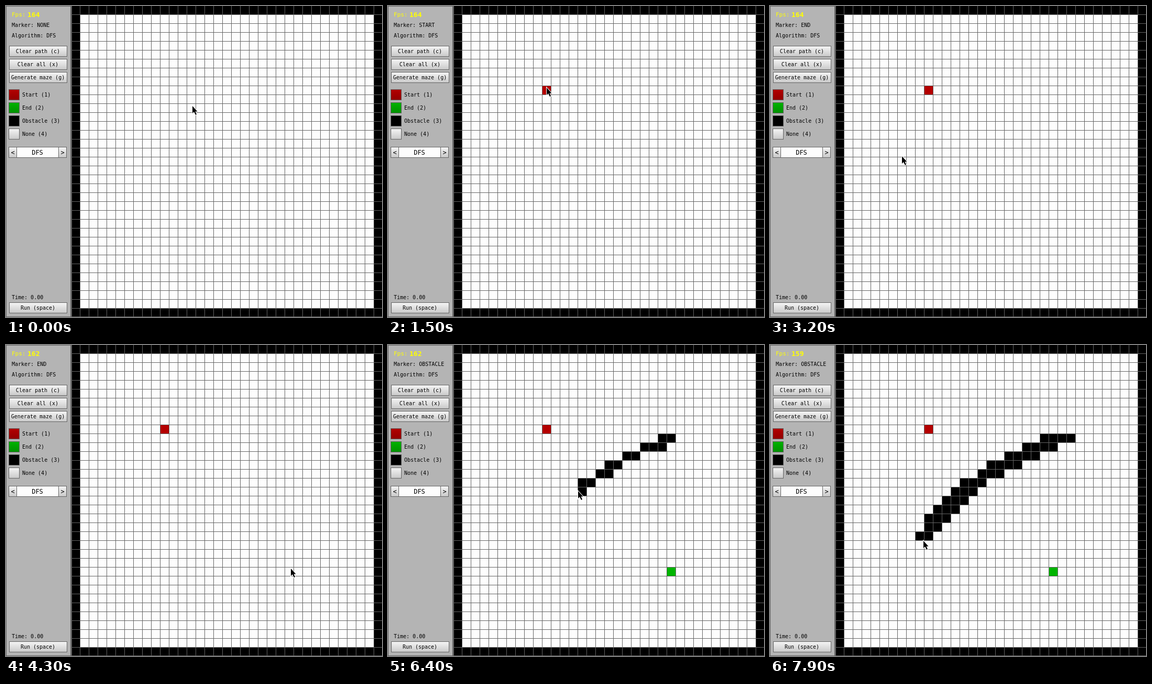
Write an HTML page with a canvas that moves like this. It is 718 by 594 pixels and loops after 8 s.

```html
<!DOCTYPE html>
<html lang="en">
<head>
<meta charset="utf-8">
<title>Pathfinding grid</title>
<style>
html, body { margin: 0; width: 100%; height: 100%; overflow: hidden; background: #000; }
canvas { display: block; }
</style>
</head>
<body>
<canvas id="stage" width="718" height="594"></canvas>
<script>
const ctx = document.getElementById('stage').getContext('2d');
const LOOP = 8000, STEP = 100, CELL = 17, LEFT = 124, TOP = -1;
const LINE = '#646464', WHITE = '#fdfdfd', SILVER = ['#f6f6f6', '#c8c8c8'];
const MONO = '"DejaVu Sans Mono", monospace';

// Where the pointer is at each time; bend is the control point of the curve leading there
const pointer = [
  { t: 0, at: [356, 191] },
  { t: 800, at: [59, 175] },
  { t: 1000, at: [14, 168] },
  { t: 1500, at: [303, 156] },
  { t: 1900, at: [457, 170] },
  { t: 2200, at: [209, 168] },
  { t: 2500, at: [14, 191] },
  { t: 2800, at: [14, 191] },
  { t: 3800, at: [609, 430] },
  { t: 4300, at: [544, 427] },
  { t: 4600, at: [544, 427] },
  { t: 5200, at: [14, 218] },
  { t: 5400, at: [14, 218] },
  { t: 5600, at: [414, 249] },
  { t: 5850, at: [545, 178] },
  { t: 6700, at: [285, 368], bend: [385, 225] },
  { t: 7400, at: [577, 176], bend: [413, 231] },
  { t: 7900, at: [293, 374], bend: [375, 219] }
];
const markers = [[0, 'NONE'], [1000, 'START'], [2800, 'END'], [5400, 'OBSTACLE']];
const fps = [[0, 164], [500, 163], [1400, 164], [3700, 162], [5000, 165], [6400, 162], [7500, 159]];
const PAINT = { from: 5850, to: 7850, every: 25 };

const held = (keys, t) => keys.filter(k => k[0] <= t).pop()[1];

function pointerAt(t) {
  const i = pointer.findIndex(k => k.t > t);
  if (i < 0) return pointer[pointer.length - 1].at;
  const a = pointer[i - 1], b = pointer[i];
  const p = (t - a.t) / (b.t - a.t), q = 1 - p;
  return [0, 1].map(n => {
    const mid = b.bend ? b.bend[n] : (a.at[n] + b.at[n]) / 2;
    return Math.round(q * q * a.at[n] + 2 * p * q * mid + p * p * b.at[n]);
  });
}

function rect(x, y, w, h, color) {
  ctx.fillStyle = color;
  ctx.fillRect(x, y, w, h);
}

function text(s, x, y, size = 10, color = '#000', align = 'left', weight = '') {
  ctx.font = `${weight} ${size}px ${MONO}`;
  ctx.textAlign = align;
  ctx.fillStyle = color;
  ctx.fillText(s, x, y);
}

function box(x, y, w, h, [top, bottom]) {
  const g = ctx.createLinearGradient(0, y, 0, y + h);
  g.addColorStop(0, top);
  g.addColorStop(1, bottom);
  rect(x, y, w, h, LINE);
  rect(x + 1, y + 1, w - 2, h - 2, g);
}

function button(label, y) {
  box(6, y, 111, 21, SILVER);
  text(label, 61, y + 14, 10, '#000', 'center');
}

// Fills the cell that holds a point
function paint([x, y], color) {
  const col = Math.floor((x - LEFT) / CELL), row = Math.floor((y - TOP) / CELL);
  rect(LEFT + col * CELL, TOP + row * CELL, CELL, CELL, color);
}

function drawGrid(t) {
  rect(LEFT, 0, 594, 594, '#000');
  rect(141, 16, 561, 561, WHITE);
  for (let s = PAINT.from; s < Math.min(t, PAINT.to); s += PAINT.every) {
    paint(pointerAt(s), '#000');
  }
  if (t >= 1500) paint([303, 156], '#b40000');
  if (t >= 4600) paint([544, 427], '#00b400');
  for (let i = 0; i < 35; i++) {
    rect(LEFT + i * CELL, 0, 1, 594, LINE);
    rect(LEFT, TOP + i * CELL, 594, 1, LINE);
  }
  rect(LEFT, 593, 594, 1, LINE);
}

function drawPanel(t) {
  rect(0, 0, 126, 594, LINE);
  rect(1, 1, 122, 592, '#b4b4b4');
  text('Fps:', 11, 20, 11, '#ff0');
  text(held(fps, t), 41, 21, 13, '#ff0', 'left', 'bold');
  text('Marker: ' + held(markers, t), 11, 40);
  text('Algorithm: DFS', 11, 60);
  button('Clear path (c)', 76);
  button('Clear all (x)', 101);
  button('Generate maze (g)', 126);
  [
    ['Start (1)', ['#b40000', '#900000']],
    ['End (2)', ['#00b400', '#009000']],
    ['Obstacle (3)', ['#000', '#000']],
    ['None (4)', SILVER]
  ].forEach(([label, colors], i) => {
    box(5, 159 + i * 25, 21, 21, colors);
    text(label, 31, 173 + i * 25);
  });
  box(5, 269, 111, 21, [WHITE, WHITE]);
  box(5, 269, 16, 21, SILVER);
  box(100, 269, 16, 21, SILVER);
  text('<', 13, 284, 12, '#000', 'center');
  text('DFS', 60, 284, 12, '#000', 'center');
  text('>', 108, 284, 12, '#000', 'center');
  text('Time: 0.00', 11, 560);
  button('Run (space)', 566);
}

const arrow = new Path2D('M0 0V14L3 11L6 17L8 16L5.5 10.5H9.5Z');

function drawPointer(t) {
  ctx.save();
  ctx.translate(...pointerAt(t));
  ctx.strokeStyle = '#fff';
  ctx.lineWidth = 2;
  ctx.stroke(arrow);
  ctx.fillStyle = '#000';
  ctx.fill(arrow);
  ctx.restore();
}

const start = performance.now();
function frame() {
  const t = Math.floor((performance.now() - start) % LOOP / STEP) * STEP;
  drawGrid(t);
  drawPanel(t);
  drawPointer(t);
  requestAnimationFrame(frame);
}
frame();
</script>
</body>
</html>
```
